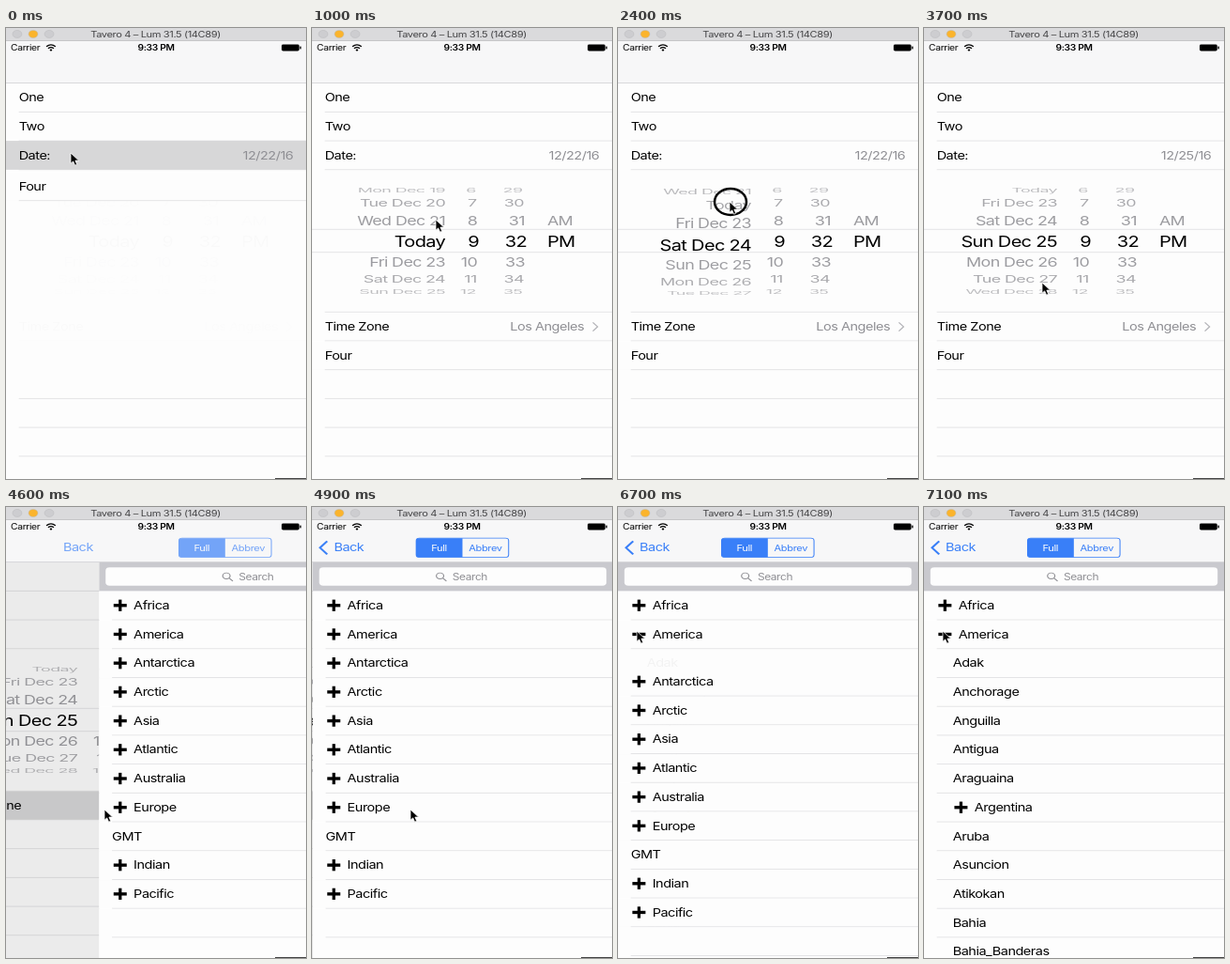
An HTML page that plays this animation: 320 px wide and 480 px high, repeating every 8 s.

```html
<!DOCTYPE html>
<html lang="en">
<head>
<meta charset="utf-8">
<title>Date picker demo</title>
<style>
  html, body { margin: 0; width: 320px; height: 480px; overflow: hidden; background: #fdfdfd; }
  svg { display: block; }
  text { font-family: Inter, Roboto, "Open Sans", sans-serif; letter-spacing: -.034em; white-space: pre; }
</style>
</head>
<body>
<svg id="stage" width="320" height="480" viewBox="0 0 320 480"></svg>
<script>
const LOOP = 8000;
const ROW = 44;
const C = {
  page: '#fdfdfd', nav: '#f7f7f8', line: '#e2e2e4', ink: '#000', grey: '#8e8e93',
  bar: '#c9c9ce', pressed: '#d7d7d8', title: '#dadadc', blue: '#397ff8'
};

// Markup helpers, in device points
const text = (x, y, s, size = 17, fill = C.ink, anchor = 'start', weight = 400, id = '') =>
  `<text ${id && `id="${id}"`} x="${x}" y="${y}" font-size="${size}" fill="${fill}" text-anchor="${anchor}" font-weight="${weight}">${s}</text>`;
const rect = (x, y, w, h, fill, extra = '') =>
  `<rect x="${x}" y="${y}" width="${w}" height="${h}" fill="${fill}" ${extra}/>`;
const group = (id, body, extra = '') => `<g id="${id}" ${extra}>${body}</g>`;
const line = (y, x = 16) => rect(x, y - .7, 375 - x, 1.3, C.line);
const label = (top, s, x = 16) => text(x, top + 28, s);
const plus = (x, y, id = '') =>
  rect(x - 8.2, y - 2.4, 16.4, 4.8, C.ink) +
  rect(x - 1.9, y - 8.8, 3.8, 17.6, C.ink, id && `id="${id}"`);
const magnifier = (x, y) =>
  `<g fill="none" stroke="${C.grey}" stroke-width="1.4"><circle cx="${x}" cy="${y}" r="4.6"/><path d="M${x + 3.4} ${y + 3.4}l4.6 4.6"/></g>`;

// Picker wheel
const MID = 304.6, RADIUS = 85.6, STEP = .377;
const WEEK = ['Sun', 'Mon', 'Tue', 'Wed', 'Thu', 'Fri', 'Sat'];
const dayName = i => i === 0 ? 'Today' : `${WEEK[(11 + i) % 7]} Dec ${22 + i}`;
const columns = [
  { x: 166.5, anchor: 'end', from: -4, to: 7, name: dayName, pull: 0, gap: 0 },
  { x: 208.6, anchor: 'end', from: -3, to: 3, name: i => 9 + i, pull: 3, gap: 2 },
  { x: 268.4, anchor: 'end', from: -3, to: 3, name: i => 32 + i, pull: 6, gap: 2 },
  { x: 294, anchor: 'start', from: -1, to: 0, name: i => i ? 'AM' : 'PM', pull: 0, gap: 0 }
];
const each = fn => columns.map((c, n) => {
  let out = '';
  for (let i = c.from; i <= c.to; i++) out += fn(c, n, i);
  return out;
}).join('');
const dimItems = each((c, n, i) => text(0, 7.6, c.name(i), 21, C.grey, c.anchor, 400, `dim${n}_${i}`));
const bigItems = each((c, n, i) => text(0, 8.5, c.name(i), 23.5, C.ink, c.anchor, 400, `big${n}_${i}`));

const picker = group('picker',
  `<g clip-path="url(#outside)">${dimItems}</g><g clip-path="url(#band)">${bigItems}</g>` +
  line(287, 0) + line(322, 0) + line(413) + line(457) +
  label(413, 'Time Zone') + text(340, 441, 'Los Angeles', 17, C.grey, 'end') +
  '<path d="M351 429l6 6.5-6 6.5" fill="none" stroke="#b4b4b9" stroke-width="1.6"/>');

const form = group('form',
  rect(0, 64, 375, 604, C.page) +
  [108, 152, 196, 545, 589, 633].map(y => line(y)).join('') +
  rect(0, 413, 375, ROW, C.pressed, 'id="zoneHit"') + picker +
  rect(0, 152, 375, ROW, C.pressed, 'id="dateHit"') +
  label(64, 'One') + label(108, 'Two') + label(152, 'Date:') +
  text(359, 180, '12/22/16', 17, C.grey, 'end', 400, 'dateValue') +
  group('four', rect(0, 1, 375, ROW - 1, C.page) + label(0, 'Four') + line(ROW)) +
  rect(0, 64, 375, 604, '#000', 'id="shade"'));

// Time zone list
const top0 = 108;
const zoneRow = (s, i) => {
  const y = top0 + i * ROW, leaf = s === 'GMT';
  return rect(0, y + 1, 375, ROW - 1, C.page) +
    (leaf ? '' : plus(26.2, y + 22, s === 'America' ? 'stem' : '')) +
    label(y, s, leaf ? 16 : 43) + line(y + ROW);
};
const zones = ['Africa', 'America', 'Antarctica', 'Arctic', 'Asia', 'Atlantic', 'Australia',
  'Europe', 'GMT', 'Indian', 'Pacific'].map(zoneRow);
const cities = ['Adak', 'Anchorage', 'Anguilla', 'Antigua', 'Araguaina', 'Argentina', 'Aruba',
  'Asuncion', 'Atikokan', 'Bahia', 'Bahia_Banderas'].map((s, i) => {
    const y = top0 + (i + 2) * ROW, branch = s === 'Argentina';
    return (branch ? plus(46.2, y + 22) : '') + label(y, s, branch ? 63 : 36) + line(y + ROW);
  }).join('');

const list = group('list',
  rect(0, 64, 375, 604, C.page) +
  group('cities', cities) +
  group('rest', zones.slice(2).join('') + rect(0, 593, 375, 80, C.page) + line(636)) +
  zones.slice(0, 2).join('') +
  rect(0, 64, 375, ROW, C.bar) + rect(8, 72, 359, 28, C.page, 'rx="5"') +
  magnifier(159, 85) + text(174.5, 91, 'Search', 14, C.grey));

const navBar = rect(0, 0, 375, 64, C.nav) + rect(0, 63.3, 375, 1.2, '#d2d2d5') +
  group('navItems',
    `<path id="chevron" d="M19 32l-9 10 9 10" fill="none" stroke="${C.blue}" stroke-width="2.6"/>` +
    group('back', text(27, 48, 'Back', 17, C.blue)) +
    group('tabs',
      rect(129.5, 27.5, 115.5, 29, C.nav, `rx="4" stroke="${C.blue}" stroke-width="1.2"`) +
      `<path d="M187.3 27.5h-54a4 4 0 0 0-4 4v21a4 4 0 0 0 4 4h54z" fill="${C.blue}"/>` +
      text(158, 46.7, 'Full', 13, C.page, 'middle') + text(216, 46.7, 'Abbrev', 13, C.blue, 'middle')));

const statusBar = text(6, 14.4, 'Carrier', 12) +
  `<g fill="none" stroke="${C.ink}" stroke-width="1.7"><path d="M50.5 8.2q5.7-5 11.4 0M52.7 11q3.5-3 7 0"/></g>
   <circle cx="56.2" cy="13.6" r="1.5" fill="${C.ink}"/>` +
  text(187.5, 14.4, '9:33 PM', 12, C.ink, 'middle', 600) +
  rect(344.5, 5, 22, 10, C.ink, 'rx="2"') + rect(367.3, 8, 1.6, 4, C.ink);

const light = (x, fill) => `<circle cx="${x}" cy="-10.8" r="5.8" fill="${fill}" stroke="#b8b8bb" stroke-width=".6"/>`;
const titleBar = rect(0, -21, 375, 21, C.title) + rect(0, -1.2, 375, 1.2, '#c2c2c5') +
  light(14, '#cdcdd0') + light(34, '#fbb42c') + light(54, '#cdcdd0') +
  text(187, -6.2, 'Tavero 4 – Lum 31.5 (14C89)', 13, '#444446', 'middle');

document.getElementById('stage').innerHTML = `
  <defs>
    <clipPath id="band"><rect y="287" width="375" height="35"/></clipPath>
    <clipPath id="outside"><path d="M0 196h375v91H0zM0 322h375v91H0z"/></clipPath>
  </defs>
  <g transform="translate(0 14) scale(.85333 .698)">${form}${list}${navBar}${statusBar}${titleBar}</g>
  <rect x="287" y="479" width="33" height="1" fill="#444"/>
  <ellipse id="ring" rx="17" ry="14" fill="none" stroke="#000" stroke-width="2.5"/>
  <path id="mouse" d="M0 0V11.2L2.7 8.9 4.6 13.2 6.7 12.3 4.9 8.1H8.7Z" fill="#000" stroke="#fff" stroke-width=".8"/>`;

const el = {};
document.querySelectorAll('#stage [id]').forEach(e => el[e.id] = e);

// Timing helpers
const clamp = u => Math.min(1, Math.max(0, u));
const smooth = u => u * u * (3 - 2 * u);
const easeOut = u => 1 - (1 - u) ** 2.4;
const span = (t, a, b) => clamp((t - a) / (b - a));
const mix = (a, b, u) => a + (b - a) * u;
const move = (e, x, y = 0) => e.setAttribute('transform', `translate(${x} ${y})`);
const fade = (e, a) => {
  e.setAttribute('opacity', a);
  e.style.display = a > 0 ? '' : 'none';
};

// time, x, y
const path = [
  [0, 69, 133], [350, 69, 133], [900, 132, 204], [1150, 132, 204], [1600, 125, 227],
  [1750, 125, 227], [2400, 119, 185], [2550, 118, 180], [3350, 118, 180], [3700, 126, 271],
  [4100, 105, 322], [4900, 105, 322], [5300, 88, 300], [5700, 28, 169], [6100, 17, 144],
  [6400, 20, 132], [LOOP, 20, 132]
];
function pointer(t) {
  const i = path.findIndex(k => k[0] > t);
  const a = path[i - 1], b = path[i], u = smooth(span(t, a[0], b[0]));
  return [mix(a[1], b[1], u), mix(a[2], b[2], u)];
}

function dayPosition(t) {
  const drag = 1.83 * smooth(span(t, 1750, 2400)) + .2 * smooth(span(t, 2400, 2550));
  return drag + (3 - 2.03) * easeOut(span(t, 2550, 3200));
}

function spin(n, pos) {
  const c = columns[n];
  for (let i = c.from; i <= c.to; i++) {
    const d = i - pos, a = d * STEP, depth = Math.cos(a);
    const dim = el[`dim${n}_${i}`], big = el[`big${n}_${i}`];
    fade(dim, Math.abs(d) < 3.8 ? .3 + .62 * depth : 0);
    const x = c.x - c.gap - c.pull * (1 - depth);
    dim.setAttribute('transform', `translate(${x} ${MID + RADIUS * Math.sin(a)}) scale(1 ${Math.max(.01, depth)})`);
    fade(big, Math.abs(d) < 1.2 ? 1 : 0);
    move(big, c.x, MID + 34 * d);
  }
}

function draw(t) {
  const open = smooth(span(t, -25, 375));
  move(el.four, 0, mix(196, 457, open));
  fade(el.picker, open);
  fade(el.dateHit, 1 - span(t, 100, 450));
  el.dateValue.textContent = t < 3400 ? '12/22/16' : '12/25/16';
  spin(0, dayPosition(t));

  const push = easeOut(span(t, 4382, 4950));
  fade(el.zoneHit, t >= 4382 ? 1 : 0);
  fade(el.shade, .1 * push);
  move(el.form, -112 * push);
  fade(el.list, t >= 4382 ? 1 : 0);
  move(el.list, 375 * (1 - push));
  fade(el.navItems, push);
  move(el.back, 143 * (1 - push));
  move(el.tabs, 279 * (1 - push));
  fade(el.chevron, clamp((push - .75) * 4));

  const grow = smooth(span(t, 6660, 7000));
  move(el.rest, 0, 700 * grow);
  fade(el.cities, grow);
  fade(el.stem, t < 6680 ? 1 : 0);

  const [x, y] = pointer(t);
  move(el.mouse, x, y);
  move(el.ring, x + 1, y);
  fade(el.ring, t >= 1700 && t < 2600 ? 1 : 0);
}

for (const n of [1, 2, 3]) spin(n, 0);
const start = performance.now();
function tick() {
  draw((performance.now() - start) % LOOP);
  requestAnimationFrame(tick);
}
tick();
</script>
</body>
</html>
```
